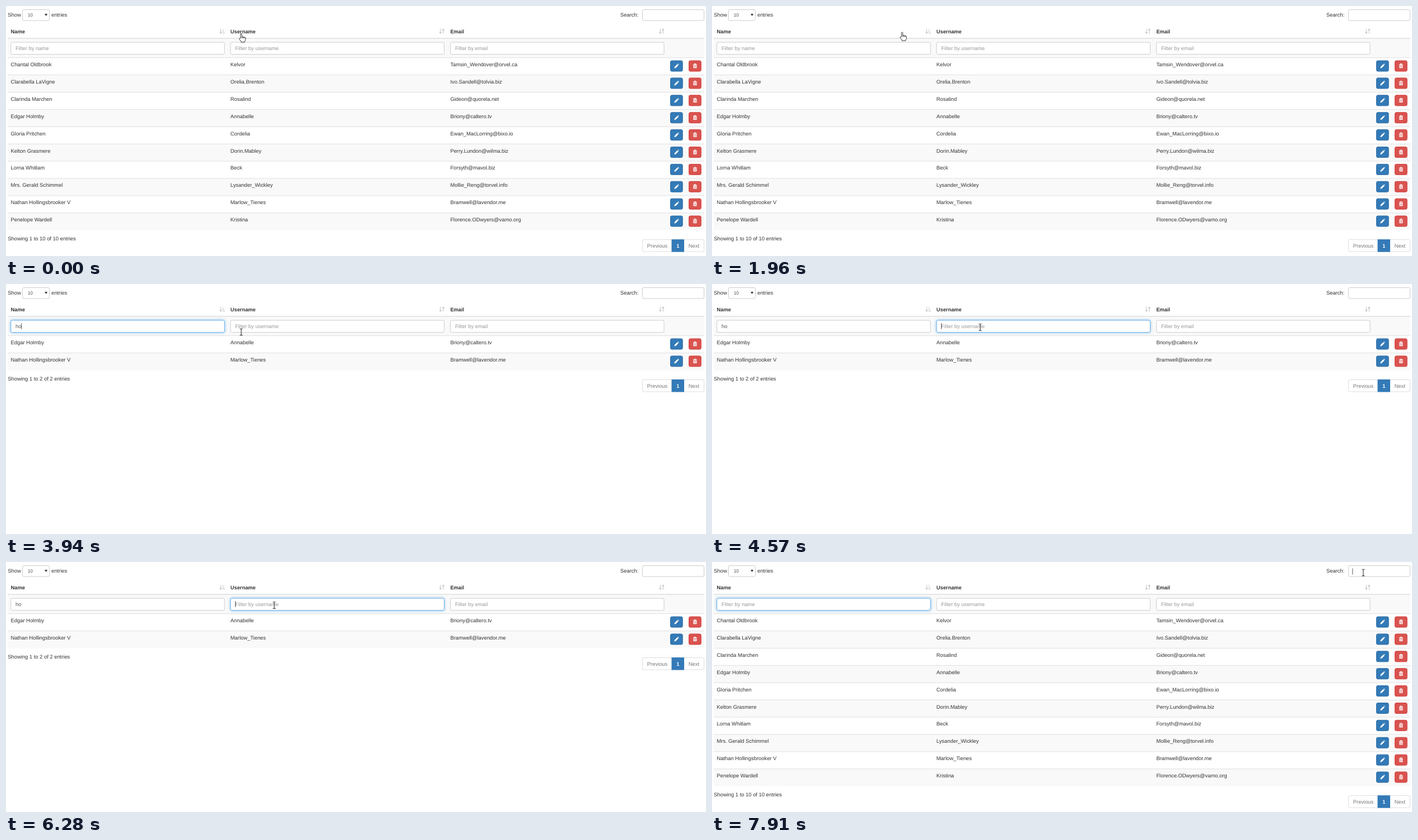
An HTML page for the animation above (8000 ms loop, 1250 by 448 pixels).

```html
<!DOCTYPE html>
<html lang="en">
<head>
<meta charset="utf-8">
<title>Filterable table</title>
<style>
  html, body { margin: 0; width: 100%; height: 100%; overflow: hidden; background: #fff; }
  svg { display: block; font: 9.4px "Liberation Sans", Arial, sans-serif; text-rendering: geometricPrecision; }
  .glow { filter: drop-shadow(0 0 2.4px rgba(102, 175, 233, .75)); }
</style>
</head>
<body>
<svg id="stage" width="1250" height="448" viewBox="0 0 1250 448"></svg>
<script>
const LOOP = 8000, ROW = 30.9, BODY_TOP = 92.7;
const stage = document.getElementById('stage');
const measure = document.createElement('canvas').getContext('2d');
measure.font = '9.4px "Liberation Sans", Arial, sans-serif';

const people = [
  ['Chantal Oldbrook', 'Kelvor', 'Tamsin_Wendover@orvel.ca'],
  ['Clarabella LaVigne', 'Orelia.Brenton', 'Ivo.Sandell@tolvia.biz'],
  ['Clarinda Marchen', 'Rosalind', 'Gideon@quorela.net'],
  ['Edgar Holmby', 'Annabelle', 'Briony@caltero.tv'],
  ['Gloria Pritchen', 'Cordelia', 'Ewan_MacLorring@bixo.io'],
  ['Kelton Grasmere', 'Dorin.Mabley', 'Perry.Lundon@wilma.biz'],
  ['Lorna Whitlam', 'Beck', 'Forsyth@mavol.biz'],
  ['Mrs. Gerald Schimmel', 'Lysander_Wickley', 'Mollie_Reng@torvel.info'],
  ['Nathan Hollingsbrooker V', 'Marlow_Tienes', 'Bramwell@lavendor.me'],
  ['Penelope Wardell', 'Kristina', 'Florence.ODwyers@vamo.org']
];
const columns = [
  { title: 'Name', x: 8.5 },
  { title: 'Username', x: 400.8 },
  { title: 'Email', x: 793.4 }
];

// Each entry changes part of the state; "query" holds the filters already applied.
const done = change => ({ busy: false, ...change });
const timeline = [
  [0, { sort: 0, typed: ['', '', ''], query: ['', ''], busy: false, focus: null, glow: null }],
  [360, { busy: true }], [470, done({ sort: 1 })],
  [1910, { busy: true }], [1960, done({ sort: 0 })],
  [2810, { focus: 0, glow: 0 }],
  [3240, { typed: ['h', '', ''] }],
  [3570, { busy: true }], [3660, done({ typed: ['ho', '', ''], query: ['h', ''] })],
  [3870, { busy: true }], [3940, done({ query: ['ho', ''] })],
  [4560, { focus: 1, glow: 1 }],
  [4800, { typed: ['ho', 'a', ''] }],
  [5120, { busy: true }], [5190, done({ typed: ['ho', 'an', ''], query: ['ho', 'a'] })],
  [5510, { busy: true }], [5580, done({ query: ['ho', 'an'] })],
  [5970, { typed: ['ho', 'a', ''] }],
  [6110, { busy: true }], [6190, done({ query: ['ho', 'a'] })],
  [6270, { typed: ['ho', '', ''] }],
  [6520, { busy: true }], [6600, done({ query: ['ho', ''] })],
  [6760, { focus: 0, glow: 0 }],
  [6920, { typed: ['h', '', ''] }],
  [7070, { typed: ['', '', ''] }],
  [7230, { busy: true }], [7310, done({ query: ['', ''] })],
  [7910, { focus: 'search' }]
];

// Pointer moves: start, end, number of steps, destination, sideways dip.
const moves = [
  [50, 130, 2, 484, 51, 0],
  [910, 1540, 9, 339.5, 47.5, 34],
  [2320, 2730, 6, 312, 79, 0],
  [3870, 3940, 2, 420, 86, 0],
  [4020, 4480, 6, 479, 77.5, 0],
  [6350, 6700, 5, 224, 78, 0],
  [7390, 7690, 5, 1163, 24, 0],
  [7910, 7910, 1, 1163, 19, 0]
];

const text = (x, y, str, fill = '#333', extra = '') =>
  `<text x="${x}" y="${y}" fill="${fill}" ${extra}>${str}</text>`;
const box = (x, y, w, h, fill = '#fff', stroke = '#ccc', extra = '') =>
  `<rect x="${x}" y="${y}" width="${w}" height="${h}" rx="2.5" fill="${fill}" stroke="${stroke}" ${extra}/>`;
const fillRect = (x, y, w, h, fill) =>
  `<rect x="${x}" y="${y}" width="${w}" height="${h}" fill="${fill}"/>`;
const path = (x, y, d, fill = 'none', stroke = 'none', width = 1) =>
  `<path transform="translate(${x} ${y})" d="${d}" fill="${fill}" stroke="${stroke}" stroke-width="${width}"/>`;
const caret = (x, y) => fillRect(x, y, .8, 11, '#333');

function stateAt(t) {
  const state = {};
  for (const [start, change] of timeline) if (start <= t) Object.assign(state, change);
  return state;
}

function pointerAt(t) {
  let x = 420, y = 50;
  for (const [start, end, steps, toX, toY, dip] of moves) {
    if (t < start) break;
    const gap = (end - start) / Math.max(1, steps - 1);
    const p = gap ? Math.min(1, (Math.floor((t - start) / gap + 1e-6) + 1) / steps) : 1;
    x += (toX - x) * p;
    y += (toY - y) * p + dip * Math.sin(Math.PI * p);
  }
  return [x, y];
}

function pointer(x, y) {
  if (y > 33 && y < 58) return path(x, y,
    'M-1.2 8V.7a1.2 1.2 0 0 1 2.4 0V5L6 6a2 2 0 0 1 1.8 2v2.8L6.3 13.500v1.200H-.2v-1.200L-3.300 9.500a1.100 1.100 0 0 1 1.600-1.500zM1.200 5v3M3.500 5.500v2.500M5.700 6v2.200',
    '#fff', '#222', .9);
  return path(x, y, 'M-2.500-6Q0-6 0-4.500V4.500Q0 6-2.500 6M2.500-6Q0-6 0-4.500M0 4.500Q0 6 2.500 6', 'none', '#333', 1.1);
}

function sortIcon(x, active) {
  const down = 'M2 0V8M0 6L2 8.500L4 6';
  const rest = active ? 'M5 1H6.500M5 3.300H7.500M5 5.600H8.500M5 8H9.500' : 'M7 9V1M5 3L7 .5L9 3';
  return path(x, 40.7, down + rest, 'none', '#c8c8c8', 1.1);
}

function header(state) {
  let out = text(3.3, 19, 'Show') + box(29.5, 6.500, 48, 19.500) + text(38.700, 19, '10', '#555', 'font-size="8.400"')
    + path(69, 14, 'M0 0H5L2.500 4Z', '#333') + text(81, 19, 'entries')
    + text(1097, 19, 'Search:') + box(1136.500, 6.500, 110, 19.500)
    + fillRect(3, 57.200, 1244, 1.600, '#ddd') + fillRect(3, 58.800, 1244, 33.500, '#f9f9f9');
  columns.forEach(({ title, x }, i) => {
    const lit = state.glow === i, value = state.typed[i];
    out += text(x, 48.500, title, '#333', 'font-weight="bold" font-size="9.300"')
      + sortIcon(x + 373, state.sort === i)
      + box(x + .2, 65, 381.500, 21.700, '#fff', lit ? '#66afe9' : '#ccc', lit ? 'class="glow"' : '')
      + text(x + 8.500, 79, value || 'Filter by ' + title.toLowerCase(), value ? '#555' : '#999');
    if (state.focus === i) out += caret(x + 8.500 + measure.measureText(value).width, 70);
  });
  if (state.focus === 'search') out += caret(1143.500, 11.500);
  return out;
}

function tableRow(person, i) {
  const top = BODY_TOP + i * ROW;
  const pencil = 'M-4 4L-3.300 1.400L1.400-3.300L3.400-1.300L-1.300 3.400ZM2-3.900L2.800-4.600L4.600-2.800L3.900-2Z';
  const bin = 'M-3.500-3H-1.300V-4.200H1.300V-3H3.500V-2H-3.500ZM-3-1.400H3V4H-3Z';
  const slots = 'M-1.400-.500V3M0-.500V3M1.400-.500V3';
  return fillRect(3, top, 1244, ROW, i % 2 ? '#f9f9f9' : '#fff')
    + fillRect(3, top - .5, 1244, .9, '#ddd')
    + person.map((value, c) => text(columns[c].x, top + 15.300, value)).join('')
    + box(1186.500, top + 5.300, 21.700, 19, '#337ab7', '#2e6da4')
    + box(1219.500, top + 5.300, 21.700, 19, '#d9534f', '#d43f3a')
    + path(1197.300, top + 14.800, pencil, '#fff')
    + path(1230.400, top + 14.500, bin, '#fff') + path(1230.400, top + 14.500, slots, 'none', '#d9534f', .6);
}

function footer(count) {
  const end = BODY_TOP + count * ROW, y = end + 17;
  return text(3.300, end + 18.600, `Showing 1 to ${count} of ${count} entries`)
    + box(1136.500, y, 110, 21.500, '#fff', '#ddd')
    + fillRect(1188.500, y - .5, 22.500, 22.500, '#337ab7')
    + text(1144.800, y + 14, 'Previous', '#777')
    + text(1199.800, y + 14, '1', '#fff', 'text-anchor="middle" font-weight="bold"')
    + text(1218.800, y + 14, 'Next', '#777');
}

function processing(count) {
  const y = 217.300 - (10 - count) * ROW / 2;
  return box(559.500, y - 16.300, 131, 32.600, '#fff', '#ddd')
    + text(625, y + 3, 'Processing...', '#333', 'text-anchor="middle"');
}

function scene(t) {
  const state = stateAt(t);
  const rows = people
    .filter(person => state.query.every((q, c) => person[c].toLowerCase().includes(q)))
    .sort((a, b) => a[state.sort] < b[state.sort] ? -1 : 1);
  return header(state) + rows.map(tableRow).join('') + footer(rows.length)
    + (state.busy ? processing(rows.length) : '') + pointer(...pointerAt(t));
}

let shown = '';
function frame() {
  const markup = scene(performance.now() % LOOP);
  if (markup !== shown) stage.innerHTML = shown = markup;
  requestAnimationFrame(frame);
}
frame();
</script>
</body>
</html>
```
